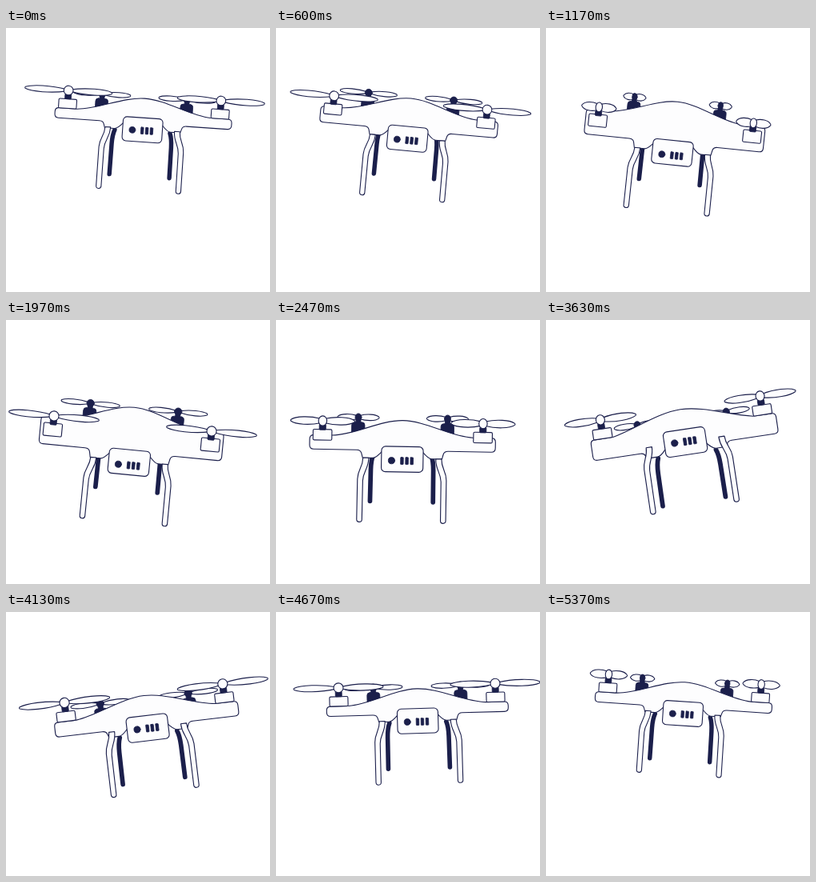
An HTML page that plays this animation: 330 px wide and 330 px high, repeating every 5.41 s.

```html
<!DOCTYPE html>
<html lang="en">
<head>
<meta charset="utf-8">
<title>Drone</title>
<style>
html, body { margin: 0; width: 100%; height: 100%; overflow: hidden; background: #fff; }
svg { display: block; width: 100vw; height: 100vh; }
#drone { fill: #fdfdfe; stroke: #1b1f4b; stroke-width: 1.1; stroke-linejoin: round; stroke-linecap: round; }
.dark { fill: #1b1f4b; stroke-width: .8; }
.strut { fill: none; stroke-width: 5.6; }
</style>
</head>
<body>
<svg viewBox="0 0 330 330"><g id="drone"></g></svg>
<script>
const LOOP = 5410;
const FRAMES = 162;

// time, x, y, tilt in degrees, scale, pitch
const poses = [
  [0, 173.5, 84.5, 3.9, .975, 1.5],
  [600, 168.3, 93.5, 5.2, .98, -8],
  [1170, 162.8, 109, 5.9, .99, -17.5],
  [1970, 158.5, 129.5, 5.5, 1.01, -20],
  [2300, 157.8, 130.5, 2.8, 1.02, -13],
  [2970, 162.4, 117.5, -4.3, 1.03, 18.5],
  [3630, 167.7, 110, -8.5, 1.03, 13],
  [4000, 170.8, 104, -7.8, 1.02, 8],
  [4670, 176, 92, -1.6, 1, 1],
  [5130, 175, 85.7, 2.5, .98, 1.5]
];

function poseKey(i) {
  const count = poses.length, turn = Math.floor(i / count);
  const [time, ...values] = poses[i - turn * count];
  return { time: time + turn * LOOP, values };
}

// Smooth periodic curve through the poses
function poseAt(t) {
  let i = poses.length - 1;
  while (poses[i][0] > t) i--;
  const [a, b, c, d] = [-1, 0, 1, 2].map(k => poseKey(i + k));
  const span = c.time - b.time, u = (t - b.time) / span;
  return b.values.map((start, k) => {
    const end = c.values[k];
    const m0 = (end - a.values[k]) / (c.time - a.time) * span;
    const m1 = (d.values[k] - start) / (d.time - b.time) * span;
    return start + u * (m0 + u * (3 * (end - start) - 2 * m0 - m1 + u * (2 * (start - end) + m0 + m1)));
  });
}

// Apparent blade length: 0 end-on, 1 side-on
function spread(frame) {
  const facing = Math.abs(Math.cos(Math.PI * (frame * (4 / 9 - .0005) - .13)));
  const u = Math.min(1, Math.max(0, (facing - .4) / .48));
  return u * u * (3 - 2 * u);
}

const path = (d, cls = '') => `<path class="${cls}" d="${d}"/>`;
const group = (transform, body) => `<g transform="${transform}">${body}</g>`;
const rect = (x, y, w, h, r, cls = '') =>
  `<rect class="${cls}" x="${x}" y="${y}" width="${w}" height="${h}" rx="${r}"/>`;
const bothSides = body => body + group('scale(-1 1)', body);

function rotor(open, size, hubClass) {
  const h = (22 + 34 * open) * size - .5, thick = .4 + .6 * size;
  const bulge = (6.4 - 1.2 * open) * thick, root = (4.2 - 3 * open) * thick;
  const x = 3 * size;
  const blade = path(`M${x} ${-root}C${h * .4} ${-bulge} ${h * .85} ${-bulge * .9} ${h} -1` +
    `Q${h + 1} 0 ${h} 1C${h * .85} ${bulge * .9} ${h * .4} ${bulge} ${x} ${root}Z`);
  const hub = hubClass ? 4.6 : 6;
  return bothSides(blade) +
    `<ellipse class="${hubClass}" rx="${hub * (.7 + .3 * open)}" ry="${hub}"/>`;
}

function backRotor(open, pitch) {
  return group(`translate(-54.5 ${pitch})`,
    rect(-3, 2, 6, 7, 1, 'dark') + rect(-8, 6, 16, 16, 3.5, 'dark') + rotor(open, .65, 'dark'));
}

function frontRotor(open, pitch) {
  const down = Math.min(pitch, 0), top = 11 + .1 * down;
  return group('translate(-98 0)',
    rect(-11.5, top, 23, 12 - .2 * down, 1.5) + rect(-4, 4.5, 8, 6.5, 1, 'dark') + rotor(open, 1, ''));
}

function backLeg(pitch) {
  const top = 45 + .9 * pitch;
  return path(`M-35.5 ${top}Q-38 ${top + 6} -38.2 ${top + 18}L-38.5 ${102 + .98 * pitch}`, 'strut');
}

function frontLeg(pitch) {
  const top = 43.5 - .14 * pitch;
  return path(`M-48 ${top}H-41C-41 ${top + 14} -47.5 ${top + 16} -47.8 ${top + 28}` +
    `L-48 119.5a3.2 3.2 0 0 1 -6.4 0L-54.3 ${top + 26}` +
    `C-54 ${top + 14} -48 ${top + 12} -48 ${top}Z`);
}

function hull(pitch) {
  const up = Math.max(pitch, 0), down = Math.min(pitch, 0);
  const crest = 4 + 1.2 * down - .17 * up;
  const top = 23 + 1.1 * down;
  const slope = top - 1 - .35 * up;
  const bottom = 34.3 + 1.05 * up - .06 * down;
  const belly = 43.3 + .88 * up - .17 * down;
  return path(`M0 ${crest}C28 ${crest} 58 ${slope} 86 ${top}H108.5q5 0 5 5` +
    `V${bottom - 5}q0 5 -5 5H56Q51 ${bottom} 50 ${bottom + 4}L48.5 ${belly}H36` +
    `Q32 ${belly} 25 ${belly - 8}H-25Q-32 ${belly} -36 ${belly}H-48.5L-50 ${bottom + 4}` +
    `Q-51 ${bottom} -56 ${bottom}H-108.5q-5 0 -5 -5V${top + 5}q0 -5 5 -5H-86` +
    `C-58 ${slope} -28 ${crest} 0 ${crest}Z`);
}

function cameraBox(pitch) {
  const bars = [0, 6, 12].map(x => rect(x - 2, -4.2, 3.4, 8.6, .5, 'dark')).join('');
  return group(`translate(0 ${44.3 - .19 * pitch})`,
    rect(-25.5, -15.5, 51, 31, 5) +
    group(`translate(0 ${1.1 - .13 * pitch})`, `<circle class="dark" cx="-13" r="4"/>` + bars));
}

const drone = document.getElementById('drone');

function render(time) {
  const frame = Math.min(FRAMES - 1, Math.floor(time * .03 + .15));
  const [x, y, tilt, scale, pitch] = poseAt(frame / .03);
  const open = spread(frame);
  drone.setAttribute('transform', `translate(${x} ${y}) rotate(${tilt}) scale(${scale})`);
  drone.innerHTML =
    bothSides(backRotor(open, pitch) + backLeg(pitch)) +
    hull(pitch) +
    bothSides(frontLeg(pitch) + frontRotor(open, pitch)) +
    cameraBox(pitch);
}

const start = performance.now();
function tick() {
  render((performance.now() - start) % LOOP);
  requestAnimationFrame(tick);
}
tick();
</script>
</body>
</html>
```
